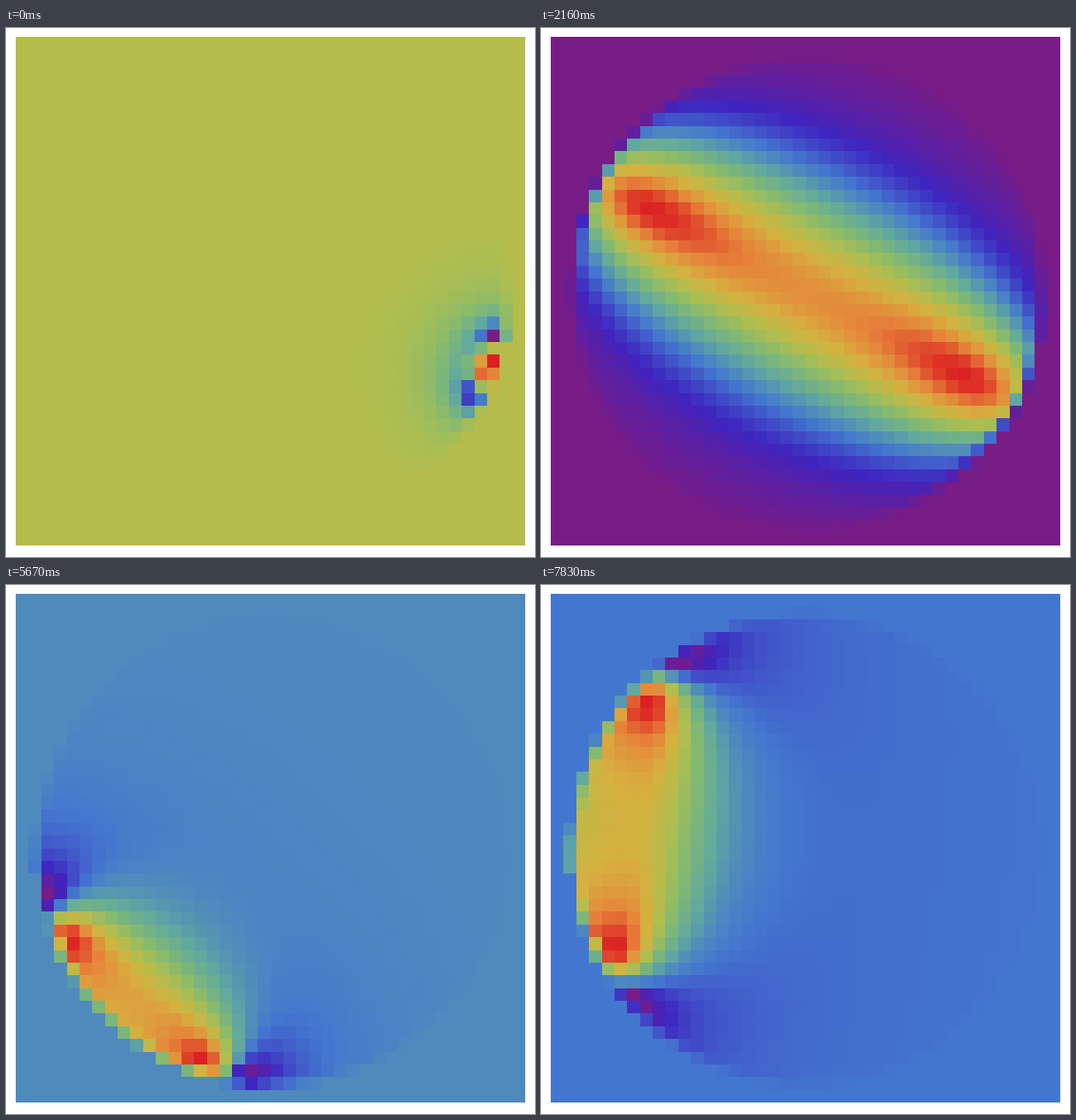
Write an HTML page with a canvas that moves like this. It is 597x598 px and loops after 8 s.

```html
<!DOCTYPE html>
<html lang="en">
<head>
<meta charset="utf-8">
<title>Sensitivity map</title>
<style>
  html, body { margin: 0; width: 100%; height: 100%; overflow: hidden; background: #fff; }
  canvas { display: block; }
</style>
</head>
<body>
<canvas id="map" width="597" height="598"></canvas>
<script>
const ctx = document.getElementById('map').getContext('2d');
const LOOP = 8000, STEP = 270, N = 40, CELL = 575 / N, LEFT = 11, TOP = 10;
const CENTRE = 20.15, RADIUS = 18.36, SUB = 4, DECAY = 5;

// Evenly spaced from lowest to highest value
const RAINBOW = ['#781c86', '#3e24c0', '#4377cf', '#60a8a0', '#83ba70',
  '#b1be4e', '#d6b13f', '#e6843a', '#db2122'].map(
  hex => [1, 3, 5].map(i => parseInt(hex.slice(i, i + 2), 16)));

// Key points of the sweep: step, angles of both poles, level of zero
const SWEEP = [
  [0, 24, 14, .64],
  [3, 211, 10.5, 0],
  [8, 208.3, 28, 0],
  [13, 204, 55, 0],
  [17, 184.5, 74.3, .165],
  [24, 146.9, 122.2, .4],
  [29, 230, 145.7, .25]
];

const mix = (a, b, u) => a.map((v, i) => v + (b[i] - v) * u);

function poseAt(step) {
  const i = Math.max(1, SWEEP.findIndex(key => key[0] >= step));
  const a = SWEEP[i - 1], b = SWEEP[i];
  return mix(a, b, (step - a[0]) / (b[0] - a[0]));
}

function colour(v) {
  const x = Math.min(1, Math.max(0, v)) * (RAINBOW.length - 1);
  const i = Math.min(RAINBOW.length - 2, Math.floor(x));
  return `rgb(${mix(RAINBOW[i], RAINBOW[i + 1], x - i).map(Math.round).join(',')})`;
}

function pole(deg, r) {
  const a = deg * Math.PI / 180;
  return { x: r * Math.cos(a), y: r * Math.sin(a) };
}

// Product of the fields of two poles; all shape values follow from their gap
function makeField(angP, angQ) {
  const half = Math.abs(Math.sin((angP - angQ) * Math.PI / 360));
  const wide = half ** 20;
  const soft = (.04 + .13 * half + .16 * wide) ** 2;
  const squeeze = .4 + .6 * wide;
  const p = pole(angP, 1 + .16 * wide), q = pole(angQ, 1 + .16 * wide);
  const mx = (p.x + q.x) / 2, my = (p.y + q.y) / 2;
  const len = Math.hypot(q.x - p.x, q.y - p.y);
  let nx = (p.y - q.y) / len, ny = (q.x - p.x) / len;
  if (nx * mx + ny * my > 0) { nx = -nx; ny = -ny; }

  return (x, y) => {
    // the side between chord and rim is flattened towards the chord
    const depth = (x - mx) * nx + (y - my) * ny;
    if (depth < 0) {
      x += depth * (squeeze - 1) * nx;
      y += depth * (squeeze - 1) * ny;
    }
    const ax = x - p.x, ay = y - p.y, bx = x - q.x, by = y - q.y;
    const a2 = ax * ax + ay * ay, b2 = bx * bx + by * by;
    const detour = Math.sqrt(a2) + Math.sqrt(b2) - len;
    return -(ax * bx + ay * by) / ((a2 + soft) * (b2 + soft) * (1 + DECAY * detour));
  };
}

// Mean of the field over the part of a cell that lies in the disc
function cellMean(field, col, row) {
  let sum = 0;
  for (let i = 0; i < SUB; i++) {
    for (let j = 0; j < SUB; j++) {
      const x = (col + (i + .5) / SUB - CENTRE) / RADIUS;
      const y = (row + (j + .5) / SUB - CENTRE) / RADIUS;
      if (x * x + y * y < 1) sum += field(x, y);
    }
  }
  return sum / (SUB * SUB);
}

function draw(step) {
  const [, angP, angQ, zero] = poseAt(step);
  const field = makeField(angP, angQ);
  const cells = Array.from({ length: N * N },
    (_, i) => cellMean(field, i % N, Math.floor(i / N)));
  const high = Math.max(...cells), low = Math.min(...cells);

  ctx.fillStyle = '#fff';
  ctx.fillRect(0, 0, 597, 598);
  cells.forEach((s, i) => {
    const col = i % N, row = Math.floor(i / N);
    const x = Math.round(LEFT + col * CELL), y = Math.round(TOP + row * CELL);
    ctx.fillStyle = colour(s < 0 ? zero * (1 - s / low) : zero + (1 - zero) * s / high);
    ctx.fillRect(x, y,
      Math.round(LEFT + (col + 1) * CELL) - x,
      Math.round(TOP + (row + 1) * CELL) - y);
  });
}

let shown = -1;
function tick() {
  const step = Math.floor(performance.now() % LOOP / STEP);
  if (step !== shown) draw(shown = step);
  requestAnimationFrame(tick);
}
tick();
</script>
</body>
</html>
```
